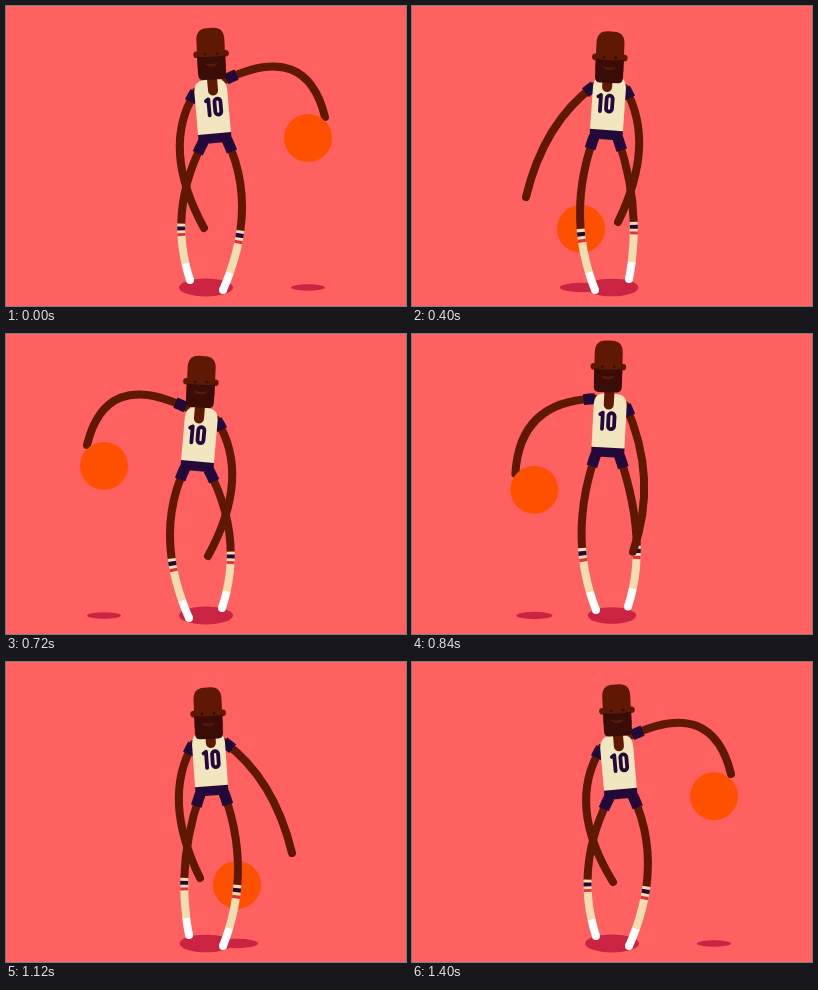
Write an HTML page that moves like this. It is 400 px wide and 300 px high and loops after 1.44 s.

```html
<!DOCTYPE html>
<html lang="en">
<head>
<meta charset="utf-8">
<title>Crossover dribble</title>
<style>
  html, body { margin: 0; width: 100%; height: 100%; overflow: hidden; background: #ff6060; }
  svg { display: block; width: 100vw; height: 100vh; }
  path { fill: none; }
  .skin { stroke: #5f1803; stroke-width: 8; }
  .navy { stroke: #22093a; stroke-width: 11; }
</style>
</head>
<body>
<svg id="stage" viewBox="0 0 400 300"></svg>
<script>
const LOOP = 1440, HALF = LOOP / 2, STEP = 40;
const SKIN = '#5f1803', BEARD = '#390c07', NAVY = '#22093a';
const CREAM = '#f1e6c0', SOCK = '#f0ddb2', RED = '#e0303c';
const SHADE = '#cb2443', BALL = '#ff5000';

const stage = document.getElementById('stage');

function add(tag, attrs = {}, parent = stage) {
  const el = document.createElementNS('http://www.w3.org/2000/svg', tag);
  set(el, attrs);
  parent.append(el);
  return el;
}

function set(el, attrs) {
  for (const name in attrs) el.setAttribute(name, attrs[name]);
}

// Looping monotone cubic through keys [time, value, value, ...]
function track(...keys) {
  const n = keys.length;
  const key = i => keys[(i + n) % n];
  const gap = i => (key(i + 1)[0] - key(i)[0] + LOOP) % LOOP;
  const slope = (i, k) => (key(i + 1)[k] - key(i)[k]) / gap(i);
  const tangent = (i, k) => {
    const a = slope(i - 1, k), b = slope(i, k);
    if (a * b <= 0) return 0;
    const h = gap(i - 1), g = gap(i);
    const w = 2 * g + h, v = g + 2 * h;
    return (w + v) / (w / a + v / b);
  };
  return time => {
    const t = time % LOOP;
    let i = n - 1;
    while (keys[i][0] > t) i--;
    const h = gap(i), u = (t - keys[i][0]) / h, r = 1 - u;
    return keys[i].slice(1).map((p, j) => {
      const k = j + 1, q = key(i + 1)[k];
      return r * r * (1 + 2 * u) * p + u * u * (3 - 2 * u) * q
        + h * u * r * (r * tangent(i, k) - u * tangent(i + 1, k));
    });
  };
}

// Second half repeats the first, with the signs given
function halves(signs, ...keys) {
  const rest = keys.map(([t, ...v]) => [t + HALF, ...v.map((x, i) => x * signs[i])]);
  return track(...keys, ...rest);
}

// Torso: x from the middle, y of the waist, lean, turn
const torsoAt = halves([-1, 1, -1, -1],
  [0, 8.5, 127.5, -5, 2.3], [160, 2, 111, -2, 1], [240, -2, 116, 0, 0],
  [400, -5.5, 124, 4, -2.4], [680, -8.4, 127.3, 5, -2.3]);

// Head: x from the middle, y of the crown, lean
const headAt = halves([-1, 1, -1],
  [0, 3.7, 22, -3], [160, 2.5, 4, -1], [240, 1.5, 9, 0],
  [400, -1, 25.5, 2.5], [680, -3.6, 22.5, 3]);

const ballX = halves([-1], [0, 102], [240, 33], [400, -31], [680, -102]);

// Right arm: middle point, hand, shoulder lift
const armAt = track(
  [0, 285, 63.5, 319, 111, -10], [240, 255.5, 117, 257, 183, 0],
  [400, 227, 143, 206, 216, 0], [680, 225.5, 148, 199, 220, 0],
  [720, 226, 148, 202, 222, 0], [960, 242, 138, 247, 209, 0],
  [1120, 260, 126, 286, 191, 0], [1400, 285, 64, 319, 112, -10]);

// Right leg: middle point, foot
const legAt = track(
  [0, 236, 205, 217, 284], [240, 223.5, 196, 215, 268],
  [400, 221, 203, 217, 273], [720, 224, 205, 216, 274],
  [960, 225, 200, 216, 271], [1120, 232, 208, 217, 284]);

const BOUNCE = 338;
function ballY(t) {
  const k = t < BOUNCE
    ? (t / BOUNCE) ** 1.6
    : ((HALF - t) / (HALF - BOUNCE)) ** 1.8;
  return 132 + 125 * k;
}

function makeLeg() {
  const group = add('g');
  const band = (from, to, stroke) => add('path', {
    stroke, 'stroke-width': 8, pathLength: 100,
    'stroke-dasharray': `0 ${from} ${to - from} 200`
  }, group);
  const lines = [
    band(0, 60.5, SKIN), band(60, 88.5, SOCK), band(62, 64.7, NAVY),
    band(66.6, 68.6, RED), band(88, 101, '#fff')
  ];
  const toe = add('circle', { r: 4, fill: '#fff' }, group);
  lines.push(add('path', { class: 'navy', 'stroke-dasharray': '13 999' }, group));
  return { lines, toe };
}

function makeArm() {
  return [
    add('path', { class: 'skin', 'stroke-linecap': 'round' }),
    add('path', { class: 'navy', 'stroke-dasharray': '11 999' })
  ];
}

add('rect', { width: 400, height: 300, fill: '#ff6060' });
const ballShade = add('ellipse', { cy: 281.5, fill: SHADE });
const bodyShade = add('ellipse', { cx: 200, cy: 281.5, fill: SHADE });
const backBall = add('circle', { r: 24, fill: BALL });
const legs = [makeLeg(), makeLeg()];
const arms = [makeArm(), makeArm()];

const torso = add('g');
add('rect', { x: -16.5, y: -1, width: 33, height: 10.5, fill: NAVY }, torso);
add('path', { d: 'M-16.5 0V-43Q-16 -54 -6 -54H6Q16 -54 16.5 -43V0Z', style: `fill:${CREAM}` }, torso);
const front = add('g', {}, torso);
add('path', { d: 'M0 -56V-43', stroke: SKIN, 'stroke-width': 10, 'stroke-linecap': 'round' }, front);
add('path', {
  d: 'M-8 -33L-5.5 -34.5V-18.5M.4 -31.5a3 3 0 0 1 6 0v10a3 3 0 0 1 -6 0z',
  stroke: NAVY, 'stroke-width': 3.8, 'stroke-linecap': 'round', 'stroke-linejoin': 'round'
}, front);

const head = add('g');
for (const side of [-1, 1]) add('circle', { cx: side * 14.5, cy: 26, r: 3.3, fill: SKIN }, head);
add('path', { d: 'M-14 40V12Q-14 0 -3 0H3Q14 0 14 12V40Z', style: `fill:${SKIN}` }, head);
add('path', { d: 'M-14 28Q0 30 14 28V46Q14 51.500 9 51.500H-9Q-14 51.500 -14 46Z', style: `fill:${BEARD}` }, head);
add('path', { d: 'M-7 35Q0 37 7 35Q5 38.500 0 38.500Q-5 38.500 -7 35Z', style: `fill:${SKIN}` }, head);
for (const side of [-1, 1]) add('circle', { cx: side * 6, cy: 26, r: 1.5, fill: BEARD }, head);

const frontBall = add('circle', { r: 24, fill: BALL });

// Point on the torso in stage coordinates
function onTorso([dx, y, lean], px, py) {
  const a = lean * Math.PI / 180, c = Math.cos(a), s = Math.sin(a);
  return [200 + dx + px * c - py * s, y + px * s + py * c];
}

// Bend from a to b whose halfway point is m
function bend(a, m, b) {
  const c = m.map((v, i) => 2 * v - (a[i] + b[i]) / 2);
  return `M${a}Q${c} ${b}`;
}

function draw(t) {
  const body = torsoAt(t);
  const [dx, waist, lean, turn] = body;
  const [hx, hy, tilt] = headAt(t);

  // The left limbs mirror the right ones half a loop apart
  [1, -1].forEach((side, i) => {
    const time = side > 0 ? t : t + HALF;
    const flip = (x, y) => [200 + side * (x - 200), y];

    const [kx, ky, fx, fy] = legAt(time);
    const foot = flip(fx, fy);
    const leg = bend(onTorso(body, side * 11.7, 7), flip(kx, ky), foot);
    legs[i].lines.forEach(p => set(p, { d: leg }));
    set(legs[i].toe, { cx: foot[0], cy: foot[1] });

    const [ex, ey, px, py, lift] = armAt(time);
    const [sx, sy] = onTorso(body, side * 15.5, -43);
    const arm = bend([sx, sy + lift], flip(ex, ey), flip(px, py));
    arms[i].forEach(p => set(p, { d: arm }));
  });

  set(torso, { transform: `translate(${200 + dx} ${waist}) rotate(${lean})` });
  set(front, { transform: `translate(${turn} 0)` });
  set(head, { transform: `translate(${200 + hx} ${hy}) rotate(${tilt})` });

  const local = t % HALF, cx = 200 + ballX(t)[0], cy = ballY(local);
  const before = local < BOUNCE - 10;
  set(frontBall, { cx, cy, visibility: before ? 'visible' : 'hidden' });
  set(backBall, { cx, cy, visibility: before ? 'hidden' : 'visible' });
  set(ballShade, { cx, rx: 17 + (cy - 132) * 0.045, ry: 3.3 + (cy - 132) * 0.015 });
  set(bodyShade, { rx: 27 - (127.5 - waist) * 0.2, ry: 9 - (127.5 - waist) * 0.05 });
}

const start = performance.now();
function tick() {
  const t = (performance.now() - start) % LOOP;
  draw(Math.floor(t / STEP) * STEP);
  requestAnimationFrame(tick);
}
tick();
</script>
</body>
</html>
```
